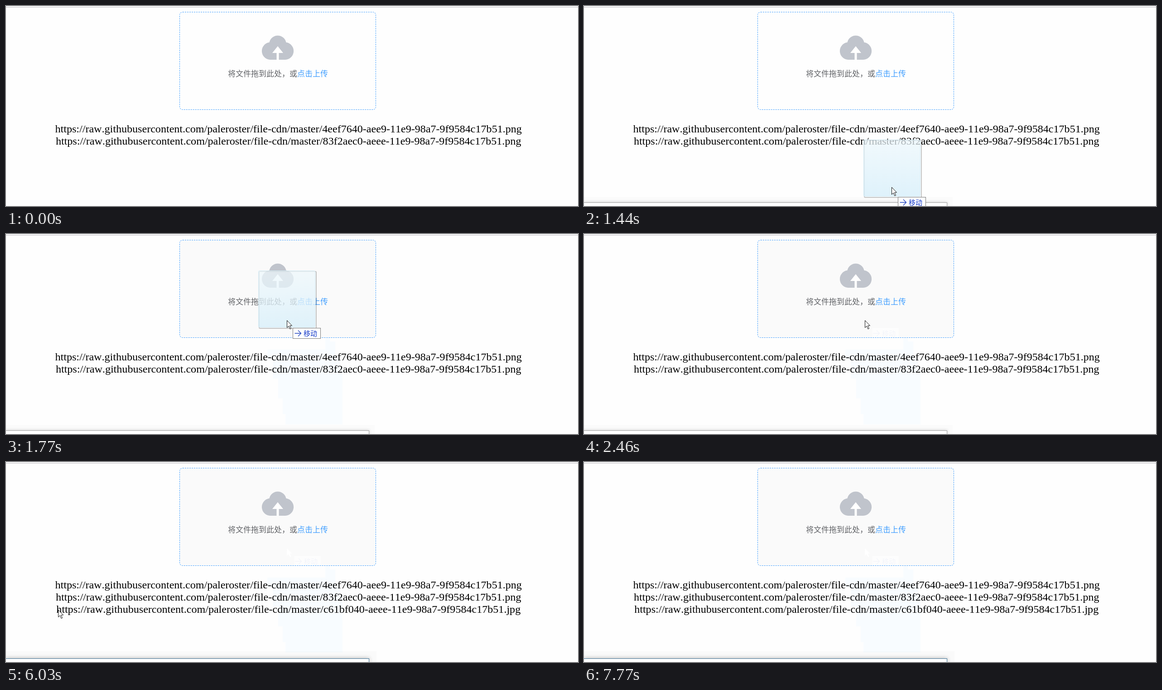
These frames come from a looping animation (1263x443 px, 8 s). An HTML page:

```html
<!DOCTYPE html>
<html lang="zh-CN">
<head>
<meta charset="utf-8">
<title>Upload demo</title>
<style>
  html, body { margin: 0; width: 100%; height: 100%; overflow: hidden; background: #fefefe; }
  svg { position: absolute; left: 0; top: 0; width: 100%; height: 100%; overflow: hidden; }
  #drop {
    position: absolute; left: 383px; top: 13px; width: 434px; height: 217px;
    box-sizing: border-box; border: 1px dashed #409eff; border-radius: 7px;
  }
  #drop.over { background: #fafafa; }
  #panel {
    position: absolute; left: 0; bottom: 0; width: 802px; height: 8px;
    box-sizing: border-box; border: solid #a2a2a2; border-width: 1px 1px 0 0; background: #fff;
    box-shadow: 0 0 6px rgba(0,0,0,.22), 0 0 0 12px rgba(0,0,0,.012);
  }
  #panel.active {
    border-color: #3f7397;
    box-shadow: 0 0 10px rgba(0,0,0,.32), 0 0 0 16px rgba(0,0,0,.014);
  }
  .url { font: 24.08px "Liberation Serif", "Times New Roman", serif; font-kerning: none; text-anchor: middle; }
  .cjk { font-family: "Noto Sans CJK SC", "Noto Sans CJK", sans-serif; font-weight: 300; }
</style>
</head>
<body>
<svg>
  <rect y="2" width="1263" height="1" fill="#b8b4ba"/>
  <path id="trail" fill="#f8fcff"/>
  <rect id="wiped" x="550" y="230" width="155" height="26" fill="#fefefe"/>
</svg>
<div id="drop"></div>
<div id="panel"></div>
<svg>
  <defs>
    <linearGradient id="glass" x2="0" y2="1">
      <stop stop-color="#eef8fc" stop-opacity=".72"/>
      <stop offset="1" stop-color="#d8effa" stop-opacity=".8"/>
    </linearGradient>
    <path id="arrow" d="M.5.5V16.5L4.2 13 7 19.5 9.5 18.4 6.7 12H11.5Z"/>
    <g id="tagText">
      <path d="M4.5 12H18M12 5.5L18.5 12 12 18.5" fill="none" stroke="#2346c0" stroke-width="1.3"/>
      <text class="cjk" x="24" y="17.5" font-size="15" fill="#1439c8">移动</text>
    </g>
  </defs>
  <g fill="#c0c4cc">
    <path d="M583.5 119A19.3 19.3 0 0 1 581.5 80.6A18.9 18.9 0 0 1 618.5 80.6A19.3 19.3 0 0 1 616.5 119Z"/>
    <path d="M600 89L612 104H602.5V119.5H597.5V104H588Z" fill="#fff"/>
  </g>
  <text class="cjk" x="490" y="155.5" font-size="17" fill="#606266">将文件拖到此处，或<tspan fill="#409eff">点击上传</tspan></text>
  <g id="urls"></g>
  <g id="tagGhost">
    <rect x="637" y="208" width="58" height="21" fill="#fdfdfd"/>
    <use href="#tagText" x="634" y="208" opacity=".04"/>
  </g>
  <use id="arrowGhost" href="#arrow" x="620" y="191" fill="#fff"/>
  <g id="thumb">
    <rect x="2" y="2" width="126" height="126" rx="2" fill="none" stroke="#000" stroke-opacity=".22" stroke-width="2"/>
    <rect x=".5" y=".5" width="125" height="125" rx="2" fill="url(#glass)" stroke="#d3ebf5"/>
  </g>
  <g id="label">
    <rect x=".5" y=".5" width="61" height="23" fill="#fff" stroke="#777"/>
    <use href="#tagText"/>
  </g>
  <use id="cursor" href="#arrow" fill="#fff" stroke="#111"/>
</svg>
<script>
const LOOP = 8000, STEP = 30;
const $ = id => document.getElementById(id);

const smooth = k => k * k * (3 - 2 * k);
// Slow grab, quick lift, soft landing
const lift = k => 1 - Math.exp(-((k / 0.426) ** 3.23));

const page = [115, 327], rest = [306, 401], dropped = [620, 191], below = [220, 450];
const moves = [
  { start: 210, end: 450, from: [1242, 65], to: [690, 450] },
  { start: 1350, end: 1800, from: [684, 420], to: dropped, ease: lift },
  { start: 5070, end: 5310, from: dropped, to: rest },
  { start: 5460, end: 5880, from: rest, to: page },
  { start: 6030, end: 6360, from: page, to: below },
  { start: 6510, end: 7320, from: below, to: page },
  { start: 7380, end: 7770, from: page, to: below }
];

const base = "https://raw.githubusercontent.com/paleroster/file-cdn/master/";
const files = ["4eef7640-aee9-11e9-98a7-9f9584c17b51.png",
               "83f2aec0-aeee-11e9-98a7-9f9584c17b51.png",
               "c61bf040-aeee-11e9-98a7-9f9584c17b51.jpg"];
$("urls").innerHTML = files.map((file, i) =>
  `<text class="url" x="623.7" y="${280 + 27 * i}">${base}${file}</text>`).join("");

function cursorAt(t) {
  const { start, end, from, to, ease = smooth } = moves.findLast(m => m.start <= t) || moves[0];
  const k = ease(Math.min(1, Math.max(0, (t - start) / (end - start))));
  return from.map((a, i) => Math.round(a + (to[i] - a) * k));
}

// The dragged parts follow slightly behind the cursor
const followerAt = t => cursorAt(t - 8);

const show = (el, on) => el.style.display = on ? "" : "none";
const place = (el, x, y) => el.setAttribute("transform", `translate(${x} ${y})`);

function trailPath(t) {
  let d = "";
  for (let s = 1440; s <= Math.min(t, 1800); s += STEP) {
    const [x, y] = followerAt(s);
    d += `M${x - 63} ${y - 110}h126v126h-126z`;
  }
  return d;
}

function draw(t) {
  const [fx, fy] = followerAt(t), over = t >= 1650;
  place($("cursor"), ...cursorAt(t));
  place($("thumb"), fx - 63, fy - 110);
  place($("label"), fx + 13, fy + 17);
  show($("cursor"), t >= 210);
  show($("thumb"), t >= 1410 && t < 2430);
  show($("label"), t >= 1410 && t < 2460);
  $("trail").setAttribute("d", trailPath(t));
  $("drop").classList.toggle("over", over);
  show($("wiped"), over);
  show($("tagGhost"), t >= 2460);
  show($("arrowGhost"), t >= 5100);
  show($("urls").lastChild, t >= 4560);
  $("panel").style.opacity = Math.min(1, Math.max(0, (t - 240) / 180));
  $("panel").classList.toggle("active", t >= 6030 && t < 6990 || t >= 7380);
}

function tick(now) {
  draw(Math.floor(now % LOOP / STEP) * STEP);
  requestAnimationFrame(tick);
}
draw(0);
requestAnimationFrame(tick);
</script>
</body>
</html>
```
